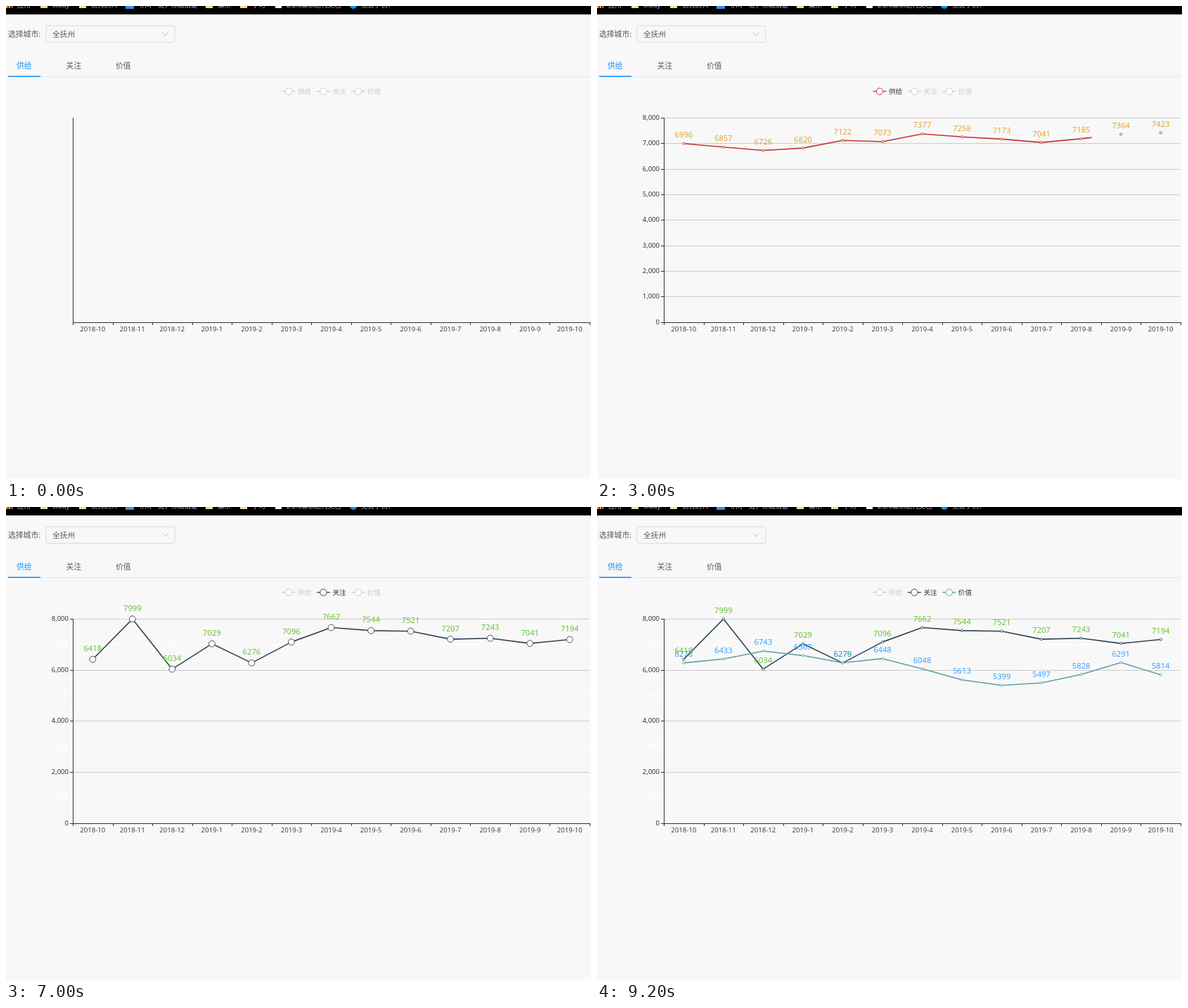
An HTML page that plays this animation: 832 by 673 pixels, repeating every 9.8 s.

```html
<!DOCTYPE html>
<html lang="zh-CN">
<head>
<meta charset="utf-8">
<title>Line chart</title>
<style>
html, body { margin: 0; width: 100%; height: 100%; overflow: hidden; background: #f8f8f8; }
svg { display: block; font-family: "Noto Sans", "Noto Sans CJK SC", "Noto Sans CJK", sans-serif; }
</style>
</head>
<body>
<svg id="stage" width="832" height="673" viewBox="0 0 832 673"></svg>
<script>
const LOOP = 9800, STEP = 100;
const LEFT = 95, WIDTH = 735, BASE = 449.8, UNIT = 290.5 / 8000;
const SMALL = 1.6, BIG = 4.6;
const COUNT = 13, GAP = WIDTH / COUNT;
const stage = document.getElementById('stage');

// on / off: legend toggles; hover: [time, symbol radius]
const series = [
  { name: '供给', color: '#c23531', ink: '#e6a23c', on: 2172, off: 6780,
    hover: [[2172, BIG], [2560, SMALL], [6190, BIG]],
    data: [6996, 6857, 6726, 6820, 7122, 7073, 7377, 7258, 7173, 7041, 7185, 7364, 7423] },
  { name: '关注', color: '#2f4554', ink: '#67c23a', on: 4378, off: LOOP,
    hover: [[4378, BIG], [6060, SMALL], [6860, BIG], [7010, SMALL]],
    data: [6418, 7999, 6034, 7029, 6276, 7096, 7662, 7544, 7521, 7207, 7243, 7041, 7194] },
  { name: '价值', color: '#61a0a8', ink: '#409eff', on: 7461, off: LOOP, drop: 7489,
    hover: [[7461, BIG], [8860, SMALL]],
    data: [6278, 6433, 6743, 6567, 6279, 6448, 6048, 5613, 5399, 5497, 5828, 6291, 5814] }
];

function add(parent, tag, attrs, text) {
  const el = document.createElementNS('http://www.w3.org/2000/svg', tag);
  set(el, attrs);
  if (text !== undefined) el.textContent = text;
  return parent.appendChild(el);
}
function set(el, attrs) {
  for (const key in attrs) el.setAttribute(key, attrs[key]);
}
const rect = (p, x, y, width, height, fill) => add(p, 'rect', { x, y, width, height, fill });
const label = (p, x, y, size, fill, text, anchor = 'start') =>
  add(p, 'text', { x, y, 'font-size': size, fill, 'text-anchor': anchor }, text);
const show = (el, yes) => el.setAttribute('visibility', yes ? 'visible' : 'hidden');
const px = i => LEFT + GAP * (i + 0.5);
const py = v => BASE - v * UNIT;

function drawHeader() {
  rect(stage, 0, 0, 832, 12, '#000');
  ['#e8b23a', '#f2a33a', '#e2553d'].forEach((c, i) => rect(stage, i * 3.6, 0, 2.4, 3, c));
  [49, 104, 284, 333].forEach(x => rect(stage, x, 0, 10, 3, '#ffe173'));
  rect(stage, 170, 0, 12, 4, '#3d8df0');
  rect(stage, 383, 0, 9, 3, '#fff');
  add(stage, 'circle', { cx: 494, cy: -1, r: 5, fill: '#0a96f5' });
  [[16, '应用'], [66, 'study'], [121, '优秀的人'], [188, '寻问一处，你就清楚'], [301, '娱乐'],
   [350, '学习'], [399, '2.2.6需求迭代文档'], [505, '免费手机1']]
    .forEach(([x, s]) => label(stage, x, 2.4, 9.4, '#b9b4cc', s));

  label(stage, 3, 44, 10.8, '#595959', '选择城市:');
  const box = add(stage, 'rect', { x: 57, y: 28, width: 183, height: 23.5, rx: 3,
    fill: '#f8f8f8', 'stroke-width': 1 });
  label(stage, 66, 44, 10.7, '#595959', '全抚州');
  add(stage, 'path', { d: 'M222.5 37.5l4 4.8l4-4.8', fill: 'none', stroke: '#bfbfbf' });

  rect(stage, 3, 100, 829, 1, '#e8e8e8');
  rect(stage, 3, 99.4, 46, 1.6, '#1890ff');
  [[15, '供给'], [85.5, '关注'], [156, '价值']].forEach(([x, s], i) =>
    label(stage, x, 89, 10.8, i ? '#595959' : '#1890ff', s));
  return box;
}

function drawLegend(s, i) {
  const x = 402 + i * 49.4, y = 121.5;
  const mark = add(stage, 'g', { 'stroke-width': 1.3 });
  add(mark, 'path', { d: `M${x - 9.5} ${y}h19` });
  add(mark, 'circle', { cx: x, cy: y, r: 4.7, fill: '#fff', 'stroke-width': 1 });
  const text = label(stage, x + 13, 124.6, 9.6, '#ccc', s.name);
  return { mark, text };
}

function drawAxes() {
  const rows = [];
  for (let k = 0; k <= 8; k++) {
    const y = Math.round(449.5 - 36.3 * k);
    const g = add(stage, 'g', {});
    const grid = k ? rect(g, LEFT + 1, y, WIDTH - 1, 1, '#ccc') : null;
    const tick = rect(g, LEFT - 4, y, 4, 1, '#333');
    const text = label(g, 89, y + 2.7, 9.5, '#333', (k * 1000).toLocaleString('en-US'), 'end');
    rows.push({ g, grid, tick, text, odd: k % 2 });
  }
  rect(stage, LEFT, 159, 1, 291, '#333');
  rect(stage, LEFT, 450, WIDTH, 1, '#333');
  for (let i = 0; i <= COUNT; i++) {
    rect(stage, Math.round(LEFT + GAP * i), 450, 1, 4, '#333');
    if (i === COUNT) break;
    const month = i < 3 ? `2018-${i + 10}` : `2019-${i - 2}`;
    label(stage, px(i), 463, 9.6, '#444', month, 'middle');
  }
  return rows;
}

function drawSeries(s, i) {
  const clip = add(stage, 'clipPath', { id: 'clip' + i });
  s.clip = rect(clip, LEFT, 0, 0, 673, '#000');
  s.group = add(stage, 'g', {});
  add(s.group, 'polyline', {
    points: s.data.map((v, n) => `${px(n)},${py(v)}`).join(' '),
    fill: 'none', stroke: s.color, 'stroke-width': 1.6, 'stroke-linejoin': 'bevel',
    'clip-path': `url(#clip${i})`
  });
  s.marks = add(s.group, 'g', {});
  s.points = s.data.map((v, n) => ({
    v,
    dot: add(s.marks, 'circle', { cx: px(n), fill: '#fff', stroke: s.color, 'stroke-width': 0.9 }),
    text: label(s.marks, px(n), 0, 11.2, s.ink, v, 'middle')
  }));
}

const box = drawHeader();
series.forEach((s, i) => { s.legend = drawLegend(s, i); });
const rows = drawAxes();
// pale traces left behind by hidden values
const traces = add(stage, 'g', { opacity: 0.45 });
series[0].data.forEach((v, n) => label(traces, px(n), py(v) - 8.6, 11.2, '#fff', v, 'middle'));
series.forEach(drawSeries);

const clamp = k => Math.max(0, Math.min(1, k));
const cubicOut = k => 1 - (1 - k) ** 3;
const elasticOut = k => k <= 0 ? 0 : k >= 1 ? 1
  : 2 ** (-10 * k) * Math.sin((k - 0.1) * 2 * Math.PI / 0.4) + 1;

function radius(hover, t) {
  return hover.reduce((r, [at, to]) => r + (to - r) * elasticOut(clamp((t - at) / 400)), SMALL);
}

function drawAt(t) {
  box.setAttribute('stroke', t >= 1100 && t < 1200 ? '#8cc6fa' : '#d9d9d9');

  const coarse = t >= series[1].on;
  for (const row of rows) {
    show(row.g, t >= series[0].on);
    const faded = coarse && row.odd;
    if (row.grid) set(row.grid, { fill: faded ? '#fff' : '#ccc' });
    for (const el of [row.tick, row.text]) set(el, { fill: faded ? '#fff' : '#333' });
  }
  show(traces, t >= series[0].off);

  for (const s of series) {
    const on = t >= s.on && t < s.off;
    set(s.legend.mark, { stroke: on ? s.color : '#ccc' });
    set(s.legend.text, { fill: on ? '#333' : '#ccc' });
    s.group.setAttribute('display', on ? 'inline' : 'none');
    if (!on) continue;
    s.clip.setAttribute('width', WIDTH * clamp((t - s.on) / 1000));
    show(s.marks, t - s.on > 35);
    const r = radius(s.hover, t);
    const lift = s.drop ? 1 + (1 - cubicOut(clamp((t - s.drop) / 300))) / 7 : 1;
    for (const p of s.points) {
      const y = py(p.v * lift);
      set(p.dot, { cy: y, r });
      p.text.setAttribute('y', y - r - 7);
    }
  }
}

const start = performance.now();
function tick() {
  const t = (performance.now() - start) % LOOP;
  drawAt(Math.floor(t / STEP) * STEP);
  requestAnimationFrame(tick);
}
tick();
</script>
</body>
</html>
```
